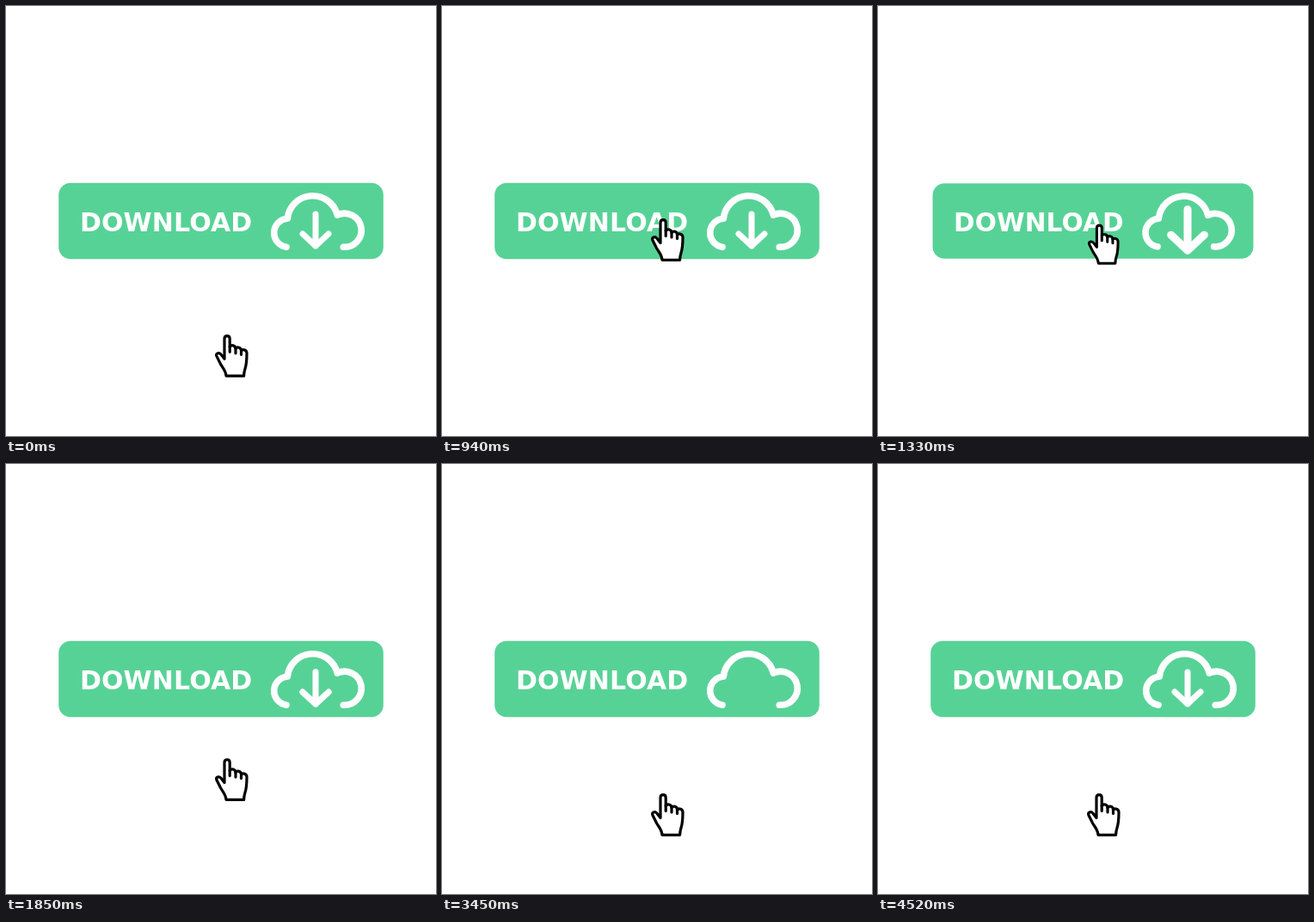
An HTML page that plays this animation: 500 px wide and 500 px high, repeating every 5 s.

```html
<!DOCTYPE html>
<html lang="en">
<head>
<meta charset="utf-8">
<title>Download button</title>
<style>
  html, body { margin: 0; width: 100%; height: 100%; overflow: hidden; background: #fff; }
  svg { display: block; width: 100%; height: 100%; }
  text { font: bold 30px "DejaVu Sans", sans-serif; letter-spacing: .1px; fill: #fff; }
  .line { fill: none; stroke: #fff; stroke-linecap: round; stroke-linejoin: round; }
</style>
</head>
<body>
<svg viewBox="0 0 500 500">
  <g id="button">
    <rect x="61.2" y="205.7" width="377.6" height="88.6" rx="14" fill="#57d296"/>
    <text x="86" y="262">DOWNLOAD</text>
    <path class="line" stroke-width="7.6" d="M326 280.2A16.6 16.6 0 0 1 327.3 247.2A29.5 29.5 0 0 1 385.3 243.2A19.5 19.5 0 1 1 392.3 280.2"/>
  </g>
  <path id="arrow" class="line" stroke-width="7" d="M360 242V279M345 265L360 279L375 265"/>
  <g id="hand" stroke="#000" stroke-width="3.2" stroke-linecap="round" stroke-linejoin="round">
    <path fill="#fff" d="M256 431.3C255.5 425 252 422 249.5 417.5L245 408.5C243.5 405 247.5 403.5 249.8 406L254 411.5V388C254 383.6 260.2 383.6 260.2 388V397.5C262 394.8 266.8 395.5 267 399.5C268.8 397 273.5 398 273.5 402C275.5 399.7 280 401 280 405C280 413 280 417 278 423Q276.7 427 276.6 431.3Z"/>
    <path fill="none" d="M260.2 397V403.5M267 399V405M273.5 402V406.5"/>
  </g>
</svg>
<script>
const [button, arrow, hand] = ["button", "arrow", "hand"].map(id => document.getElementById(id));
const LOOP = 5000;

// Eased progress from 0 to 1 between two times
function ease(t, from, to) {
  const p = Math.min(1, Math.max(0, (t - from) / (to - from)));
  return p * p * (3 - 2 * p);
}

// Rises to 1 at the peak, then falls back to 0
const pulse = (t, from, peak, to) => ease(t, from, peak) - ease(t, peak, to);

function place(el, x, y, dy, scale) {
  el.setAttribute("transform", `translate(${x} ${y + dy}) scale(${scale}) translate(${-x} ${-y})`);
}

function draw(t) {
  const press = pulse(t, 1000, 1200, 1400);
  const handY = -136 * (ease(t, -50, 900) - ease(t, 1215, 2215));
  const arrowY = t < 3000 ? 90 * ease(t, 1900, 2650) : -80 * (1 - ease(t, 3400, 4470));

  place(button, 250, 250, 0, 1 - 0.045 * press);
  place(arrow, 360, 261, arrowY, 1 + 0.4 * pulse(t, 1200, 1400, 1900));
  place(hand, 262, 408, handY, 1 - 0.18 * press);
}

const start = performance.now();
function tick() {
  draw((performance.now() - start) % LOOP);
  requestAnimationFrame(tick);
}
tick();
</script>
</body>
</html>
```
